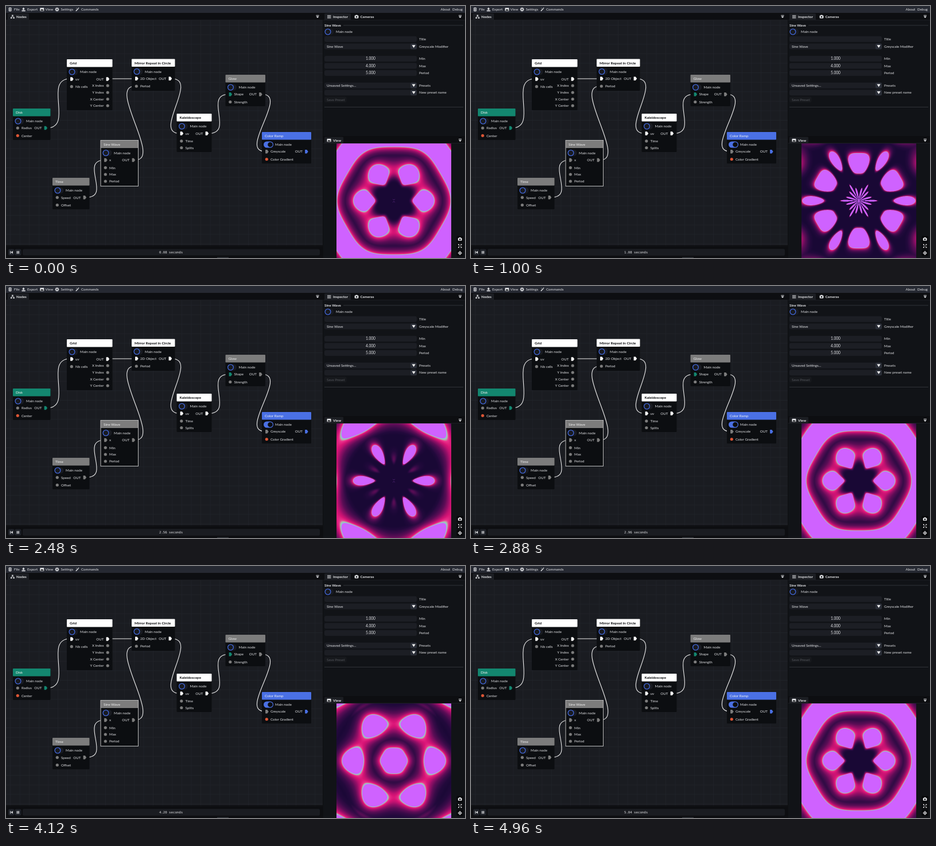
Write an HTML page with a canvas that moves like this. It is 800 px wide and 440 px high and loops after 5000 ms.

```html
<!DOCTYPE html>
<html>
<head>
<meta charset="utf-8">
<style>
html, body { margin: 0; width: 100%; height: 100%; overflow: hidden; background: #0d0e11; }
canvas { display: block; }
</style>
</head>
<body>
<canvas id="stage" width="800" height="440"></canvas>
<script>
const ctx = document.getElementById('stage').getContext('2d');
const SANS = 'Lato, "Open Sans", sans-serif';
const MONO = '"DejaVu Sans Mono", monospace';
const WHITE = '#ffffff', GREY = '#7c7c7c', GREEN = '#13866f', BLUE = '#4a70e4', RED = '#dc5535';
const BODY = '#0c0e11', FIELD = '#1c1e24', TEXT = '#e2e3e6', TAB = '#1c1e23', MENU = '#262932';

function rect(x, y, w, h, color, r = 0) {
  ctx.fillStyle = color;
  ctx.beginPath();
  ctx.roundRect(x, y, w, h, r);
  ctx.fill();
}

function text(s, x, y, { color = TEXT, align = 'left', weight = 400, size = 6.2, font = SANS } = {}) {
  ctx.font = `${weight} ${size}px ${font}`;
  ctx.textAlign = align;
  ctx.textBaseline = 'middle';
  ctx.fillStyle = color;
  ctx.fillText(s, x, y + 0.4);
}

function dot(x, y, r, color) {
  ctx.fillStyle = color;
  ctx.beginPath();
  ctx.arc(x, y, r, 0, Math.PI * 2);
  ctx.fill();
}

function ring(x, y, r, color, width = 1) {
  ctx.strokeStyle = color;
  ctx.lineWidth = width;
  ctx.beginPath();
  ctx.arc(x, y, r, 0, Math.PI * 2);
  ctx.stroke();
}

function poly(color, ...pts) {
  ctx.fillStyle = color;
  ctx.beginPath();
  for (let i = 0; i < pts.length; i += 2) ctx.lineTo(pts[i], pts[i + 1]);
  ctx.closePath();
  ctx.fill();
}

function line(x1, y1, x2, y2, color, width = 1) {
  ctx.strokeStyle = color;
  ctx.lineWidth = width;
  ctx.beginPath();
  ctx.moveTo(x1, y1);
  ctx.lineTo(x2, y2);
  ctx.stroke();
}

function toggle(x, y, on) {
  if (on) {
    rect(x - 8, y - 5.5, 17, 11, BLUE, 5.5);
    dot(x + 3.5, y, 4.3, BODY);
    return;
  }
  rect(x - 5.5, y - 5.5, 16, 11, '#191b21', 5.5);
  ring(x, y, 4.9, '#4268dc', 1.3);
}

const flag = (x, y, color) =>
  poly(color, x - 2.6, y - 3.2, x + 0.6, y - 3.2, x + 3, y, x + 0.6, y + 3.2, x - 2.6, y + 3.2);

// Pins are [kind, label, y, color]; kind is flag or dot
function node({ x, y, w, h, title, color, on, selected, ins, out, extra = [] }) {
  const light = color === WHITE;
  rect(x, y, w, h, BODY, 1.5);
  rect(x, y, w, 13.5, color, 1);
  text(title, x + 5, y + 7, { color: light ? '#08090b' : '#f2f2f2', weight: light ? 700 : 400, size: 6.3 });
  if (selected) {
    ctx.strokeStyle = '#b9b9b9';
    ctx.lineWidth = 1;
    ctx.strokeRect(x, y, w, h);
  }
  toggle(on ? x + 11 : x + 9, y + 22, on);
  text('Main node', x + 23, y + 22);
  for (const [kind, label, py, c] of ins) {
    kind === 'flag' ? flag(x + 8.7, py, c) : dot(x + 8.3, py, 2.6, c);
    text(label, x + 15, py);
  }
  flag(x + w - 8.3, out[0], out[1]);
  text('OUT', x + w - 15, out[0], { align: 'right' });
  for (const [label, py] of extra) {
    dot(x + w - 8.3, py, 2.6, GREY);
    text(label, x + w - 15, py, { align: 'right' });
  }
}

// Link tangents grow with distance and saturate at a fixed strength
function link(x1, y1, x2, y2) {
  const strength = 48, half = Math.hypot(x2 - x1, y2 - y1) / 2;
  const d = strength * Math.sin(Math.PI / 2 * Math.min(1, half / strength));
  ctx.strokeStyle = '#eeeeee';
  ctx.lineWidth = 1.1;
  ctx.beginPath();
  ctx.moveTo(x1, y1);
  ctx.bezierCurveTo(x1 + d, y1, x2 - d, y2, x2, y2);
  ctx.stroke();
}

function panelMenu(x, y) {
  rect(x - 2.6, y - 2.6, 5.2, 1, TEXT);
  poly(TEXT, x - 2.6, y - 0.6, x + 2.6, y - 0.6, x, y + 2.4);
}

function cameraIcon(x, y) {
  rect(x - 3.4, y - 2, 6.8, 4.8, TEXT, 0.8);
  rect(x - 1.5, y - 3, 3, 1.4, TEXT);
  dot(x, y + 0.4, 1.3, BODY);
}

function imageIcon(x, y) {
  rect(x - 3.5, y - 2.8, 7, 5.6, TEXT, 0.7);
  poly(BODY, x - 2.6, y + 1.9, x - 0.7, y - 0.8, x + 0.4, y + 0.5, x + 1.2, y - 0.3, x + 2.7, y + 1.9);
}

function menuBar() {
  rect(0, 0, 800, 12, MENU);
  rect(4.8, 2.8, 4.6, 6.4, TEXT, 0.6);
  rect(6, 4, 2.2, 1.6, MENU);
  rect(6, 6.8, 2.2, 1.2, MENU);
  poly(TEXT, 30.5, 2.6, 33, 5.5, 31.4, 5.5, 31.4, 7.2, 29.6, 7.2, 29.6, 5.5, 28, 5.5);
  rect(27.4, 7.4, 6.4, 1.8, TEXT, 0.4);
  imageIcon(62.8, 6);
  ring(89, 6, 1.9, TEXT, 1.5);
  for (let i = 0; i < 8; i++) {
    const a = i * Math.PI / 4;
    dot(89 + 3 * Math.cos(a), 6 + 3 * Math.sin(a), 0.65, TEXT);
  }
  line(121.8, 8.8, 126, 4.4, TEXT, 1.4);
  dot(126.5, 3.6, 0.8, TEXT);
  dot(123, 4, 0.6, TEXT);
  [['File', 14], ['Export', 37], ['View', 68.5], ['Settings', 95.5], ['Commands', 131], ['About', 757.5], ['Debug', 778]]
    .forEach(([s, x]) => text(s, x, 6));
}

function nodeEditor() {
  rect(0, 12, 552, 13, '#0d0e11');
  rect(3, 13, 37, 12, TAB, 1.5);
  rect(0, 24, 552, 1, TAB);
  rect(10.2, 15.6, 2.4, 2.2, TEXT);
  rect(8, 19.6, 2.4, 2.2, TEXT);
  rect(12.4, 19.6, 2.4, 2.2, TEXT);
  line(9.2, 18.8, 13.6, 18.8, TEXT, 0.7);
  text('Nodes', 18, 18.6, { weight: 700 });
  panelMenu(543, 18.5);

  rect(0, 25, 552, 395, '#1a1c21');
  for (let x = 7.5; x < 552; x += 16.6) line(x, 25, x, 420, '#22252b', 0.8);
  for (let y = 33.5; y < 420; y += 16.6) line(0, y, 552, y, '#22252b', 0.8);

  link(71, 213, 112, 127);
  link(180, 127, 225, 127);
  link(225, 269, 224.5, 140);
  link(289, 127, 303, 222.5);
  link(353, 222.5, 389, 154);
  link(446, 154, 452, 254);
  link(140, 334, 172, 269);

  node({ x: 106, y: 93, w: 79.5, h: 89, title: 'Grid', color: WHITE,
    ins: [['flag', 'uv', 127.5, WHITE], ['dot', 'Nb cells', 140.7, GREY]], out: [127.5, WHITE],
    extra: [['X Index', 139], ['Y Index', 151], ['X Center', 162.5], ['Y Center', 174]] });
  node({ x: 219, y: 92.5, w: 75.5, h: 55.5, title: 'Mirror Repeat in Circle', color: WHITE,
    ins: [['flag', '2D Object', 126.7, WHITE], ['dot', 'Period', 140, GREY]], out: [126.7, WHITE] });
  node({ x: 12, y: 179, w: 65.5, h: 55, title: 'Disk', color: GREEN,
    ins: [['dot', 'Radius', 213, GREY], ['dot', 'Center', 226.3, RED]], out: [213, GREEN] });
  node({ x: 165, y: 234.5, w: 65.5, h: 80, title: 'Sine Wave', color: GREY, selected: true,
    ins: [['flag', 'x', 269, GREY], ['dot', 'Min', 282.3, GREY], ['dot', 'Max', 294, GREY], ['dot', 'Period', 306, GREY]],
    out: [269, GREY] });
  node({ x: 81, y: 300, w: 64.5, h: 55, title: 'Time', color: GREY,
    ins: [['dot', 'Speed', 334.3, GREY], ['dot', 'Offset', 347.5, GREY]], out: [334.3, GREY] });
  node({ x: 297.5, y: 188, w: 61, h: 67, title: 'Kaleidoscope', color: WHITE,
    ins: [['flag', 'uv', 222.5, WHITE], ['dot', 'Time', 235.8, GREY], ['dot', 'Splits', 247.5, GREY]], out: [222.5, WHITE] });
  node({ x: 382.5, y: 120, w: 69.5, h: 55, title: 'Glow', color: GREY,
    ins: [['flag', 'Shape', 154.2, GREEN], ['dot', 'Strength', 167.5, GREY]], out: [154.2, GREY] });
  node({ x: 446, y: 220, w: 86, h: 55, title: 'Color Ramp', color: BLUE, on: true,
    ins: [['flag', 'Greyscale', 254.2, GREY], ['dot', 'Color Gradient', 267.5, RED]], out: [254.2, BLUE] });
}

function player() {
  rect(0, 420, 552, 20, '#0d0e11');
  rect(0, 418, 552, 1.5, '#0a0b0d');
  rect(4, 424.5, 10.5, 11, '#20232a', 2);
  rect(15.5, 424.5, 11, 11, '#20232a', 2);
  rect(7.2, 427.8, 1, 4.6, TEXT);
  poly(TEXT, 11.8, 427.8, 11.8, 432.4, 8.4, 430.1);
  rect(18.8, 427.8, 1.5, 4.8, TEXT);
  rect(21.4, 427.8, 1.5, 4.8, TEXT);
  rect(368, 438.7, 20, 1.3, '#33363c');
}

function field(y, label, value, kind) {
  rect(555, y - 5, 161, 10, FIELD, 3);
  text(label, 720, y);
  if (kind === 'number') text(value, 635.5, y, { align: 'center', size: 6.6 });
  if (kind === 'list') {
    text(value, 559, y);
    rect(705, y - 5, 11, 10, '#2b2f38', 2);
    poly(WHITE, 707.6, y - 2.2, 713.6, y - 2.2, 710.6, y + 2.6);
  }
}

function inspector() {
  rect(552, 12, 248, 428, '#0d0e11');
  rect(553, 25, 247, 202, '#111317');
  rect(555, 13, 46, 12, TAB, 1.5);
  rect(553, 24, 247, 1, TAB);
  for (let i = 0; i < 3; i++) rect(560, 16.2 + i * 2.1, 6.4, 1, TEXT);
  text('Inspector', 570, 18.6, { weight: 700 });
  cameraIcon(611, 18.6);
  text('Cameras', 617.5, 18.6, { weight: 700 });
  panelMenu(791.5, 18.5);

  text('Sine Wave', 555, 33.3, { weight: 700 });
  line(588, 33.8, 797, 33.8, '#34373d', 0.9);
  toggle(561, 45, false);
  text('Main node', 575, 45);
  field(57.8, 'Title');
  field(70.5, 'Greyscale Modifier', 'Sine Wave', 'list');
  field(92, 'Min', '1.000', 'number');
  field(104.5, 'Max', '4.000', 'number');
  field(117, 'Period', '5.000', 'number');
  field(138.7, 'Presets', 'Unsaved Settings...', 'list');
  field(151.2, 'New preset name', '', 'list');
  rect(555, 158.5, 38.5, 10, '#17191d', 2.5);
  text('Save Preset', 559, 163.5, { color: '#55575d' });
  line(555, 176.5, 797, 176.5, '#34373d', 0.9);
}

function viewPanel() {
  rect(552, 227, 248, 13, '#0d0e11');
  rect(555, 228.5, 33, 11.5, TAB, 1.5);
  rect(553, 239, 247, 1, TAB);
  imageIcon(563, 234.5);
  text('View', 570, 234.3, { weight: 700 });
  panelMenu(791.5, 234.5);
  rect(553, 240, 247, 200, '#111317');
  for (const y of [407, 419, 431.3]) rect(785.5, y - 5.5, 11.5, 11, '#08090b', 2);
  cameraIcon(791.2, 407);
  for (const sx of [-1, 1]) for (const sy of [-1, 1]) {
    const x = 791.2 + sx * 3.2, y = 419 + sy * 3.2;
    poly(TEXT, x, y, x - sx * 2.5, y, x, y - sy * 2.5);
    line(x, y, x - sx * 2.6, y - sy * 2.6, TEXT, 0.9);
  }
  ring(791.2, 431.3, 2.4, TEXT, 0.9);
  line(787.6, 431.3, 794.8, 431.3, TEXT, 0.9);
  line(791.2, 427.7, 791.2, 434.9, TEXT, 0.9);
}

// Procedural image: kaleidoscope, circular mirror, grid of glowing disks
const SIZE = 400, CELL = 2 / 3, DISK = 0.183;
const view = document.createElement('canvas');
view.width = view.height = SIZE;
const viewCtx = view.getContext('2d');
const image = viewCtx.createImageData(SIZE, SIZE);
const pixels = new Uint32Array(image.data.buffer);
const radius = new Float32Array(SIZE * SIZE);
const dirX = new Float32Array(SIZE * SIZE);
const dirY = new Float32Array(SIZE * SIZE);

for (let j = 0, k = 0; j < SIZE; j++) for (let i = 0; i < SIZE; i++, k++) {
  const x = (i + 0.5) * 2 / SIZE - 1, y = (j + 0.5) * 2 / SIZE - 1;
  const bend = Math.sin(3 * Math.atan2(y, x)) / 3;
  const stretch = Math.hypot(1, bend);
  radius[k] = Math.hypot(x, y) * stretch;
  dirX[k] = 1 / stretch;
  dirY[k] = bend / stretch;
}

// Distance outside the disk edge (in 1/100 units) and its colour
const STOPS = [
  [0, 207, 98, 255], [0.35, 130, 220, 200], [0.9, 190, 170, 170], [1.6, 236, 50, 140],
  [3, 216, 20, 118], [6, 150, 15, 104], [10, 92, 13, 86], [15, 56, 11, 72], [21, 34, 9, 60], [30, 25, 8, 53]
];
const LUT = new Uint32Array(601);
for (let i = 0; i < LUT.length; i++) {
  const e = Math.min(i / 20, 29.99);
  const n = STOPS.findIndex(s => s[0] > e);
  const a = STOPS[n - 1], b = STOPS[n], f = (e - a[0]) / (b[0] - a[0]);
  const [r, g, bl] = [1, 2, 3].map(c => Math.round(a[c] + (b[c] - a[c]) * f));
  LUT[i] = (255 << 24) | (bl << 16) | (g << 8) | r;
}

function renderView(t) {
  const period = 2.5 + 1.5 * Math.cos(2 * Math.PI * (t - 1.5) / 5);
  for (let k = 0; k < pixels.length; k++) {
    const r = Math.abs(period - (radius[k] + 1) % (2 * period));
    let x = r * dirX[k], y = r * dirY[k];
    x -= CELL * Math.round(x / CELL);
    y -= CELL * Math.round(y / CELL);
    // The glow tightens where the mirror squeezes space
    const squeeze = Math.max(1, r / radius[k]);
    const edge = Math.max(0, Math.sqrt(x * x + y * y) - DISK) * squeeze;
    pixels[k] = LUT[Math.min(600, edge * 2000) | 0];
  }
  viewCtx.putImageData(image, 0, 0);
  ctx.drawImage(view, 576, 240, 200, 200);
}

function renderClock(t) {
  rect(29, 424.5, 518, 11, '#1a1c21', 3);
  text(t.toFixed(2) + ' seconds', 267, 430, { font: MONO, size: 5.7 });
}

ctx.imageSmoothingQuality = 'high';
nodeEditor();
player();
inspector();
viewPanel();
menuBar();

const start = performance.now();
let lastStep = -1;
function frame() {
  const step = Math.floor(Math.max(0, performance.now() - start) % 5000 / 40);
  if (step !== lastStep) {
    lastStep = step;
    const t = step * 0.04 + 0.08;
    renderView(t);
    renderClock(t);
  }
  requestAnimationFrame(frame);
}
frame();
</script>
</body>
</html>
```
